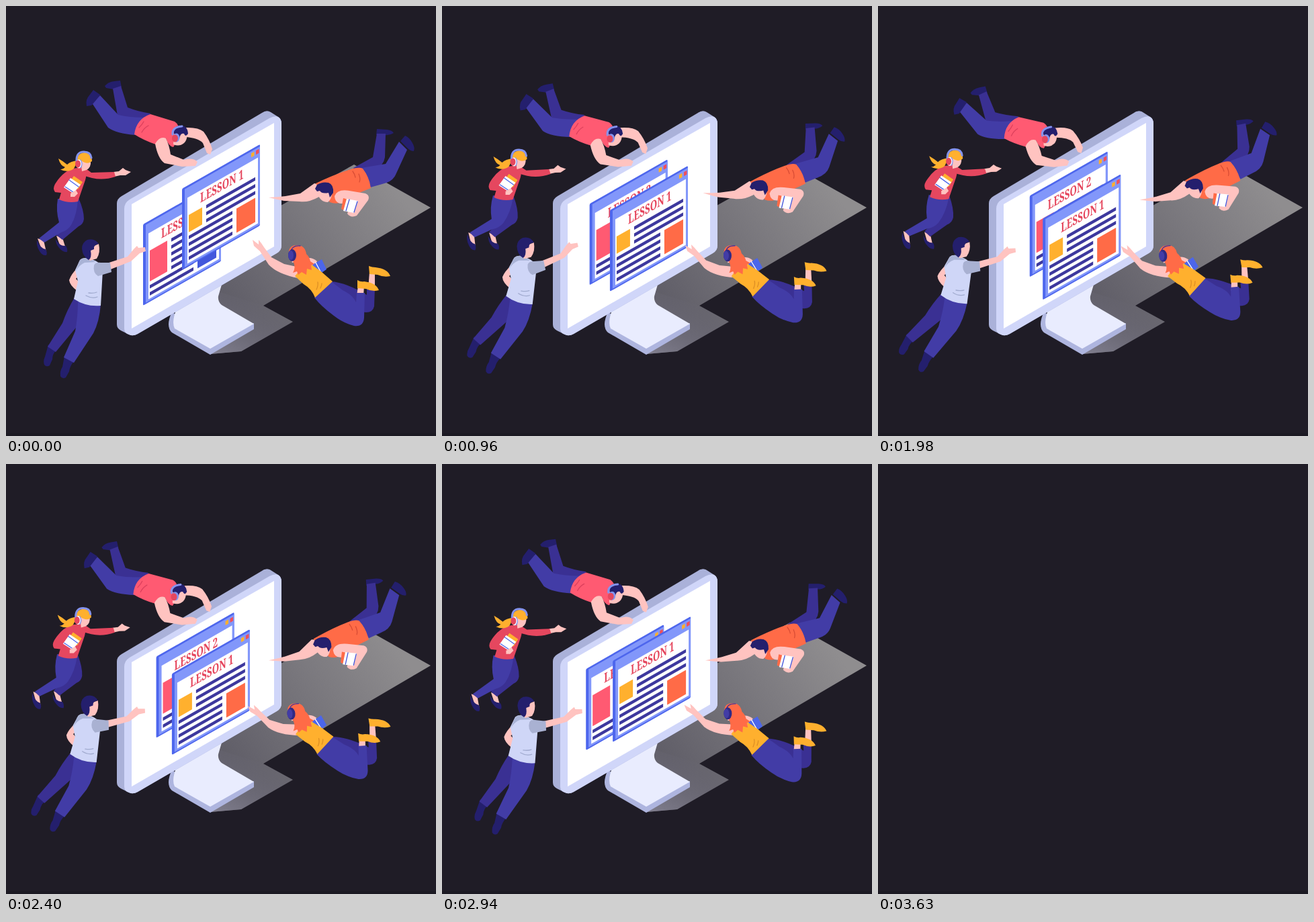
An HTML page that plays this animation: 640 by 640 pixels, repeating every 3660 ms.

```html
<!DOCTYPE html>
<html lang="en">
<head>
<meta charset="utf-8">
<title>Online lessons</title>
<style>
html, body { margin: 0; height: 100%; overflow: hidden; background: #1f1c26; }
svg { display: block; width: 100vw; height: 100vh; }
text { font: 600 19.5px "Noto Serif", serif; fill: #e5455c; }
.skin { fill: #ffc3c0; }
.near { fill: #423ca6; }
.far { fill: #3a3093; }
.dark { fill: #241f6d; }
.pink { fill: #ff5a72; }
.red { fill: #e5475f; }
.orange { fill: #ff6b47; }
.gold { fill: #ffb02e; }
.white { fill: #fff; }
.blue { fill: #4c66ea; }
.line { fill: none; stroke-width: 1.3; stroke-linecap: round; }
.band { fill: none; stroke: #8493ee; stroke-width: 3; stroke-linecap: round; }
</style>
</head>
<body>
<svg viewBox="0 0 640 640">
<defs>
  <linearGradient id="shade" gradientUnits="userSpaceOnUse" x1="330" y1="450" x2="580" y2="270">
    <stop offset="0" stop-color="#5f5d67"/><stop offset="1" stop-color="#8f8d8f"/>
  </linearGradient>
  <linearGradient id="foot" gradientUnits="userSpaceOnUse" x1="315" y1="518" x2="365" y2="425">
    <stop offset="0" stop-color="#7f7d8d"/><stop offset="1" stop-color="#686672" stop-opacity="0"/>
  </linearGradient>
</defs>
<path fill="#1b1922" d="M0 636H640V640H0Z"/>
<g id="scene">
  <path fill="url(#shade)" d="M304 518L350 514L427 470L383 446L632 300L518 236L400 302L300 420Z"/>
  <path fill="url(#foot)" d="M304 518L350 514L427 470L383 446L300 420Z"/>
  <path fill="#aeb5df" d="M247 455Q237 477 247 486L304 519L369 481V472L304 500Z"/>
  <path fill="#e9ecfe" d="M254 450Q246 470 251 480L304 510L369 473L321 445Q315 440 316 432L323 408Z"/>

  <path fill="#aab1d9" d="M165 294Q165 287 172 283L381 159Q388 154 394 158L405 165Q410 168 410 175V357Q410 364 403 368L196 488Q189 492 183 489L171 483Q165 480 165 474Z"/>
  <path fill="#d0d6f9" d="M176 302Q176 293 184 288L392 167Q400 163 405 165Q410 168 410 175V357Q410 364 403 368L196 488Q189 492 183 489Q176 487 176 480Z"/>
  <path class="white" d="M187 295L399 174V358L187 480Z"/>
  <g id="back"></g>
  <g id="front"></g>

  <g id="A">
    <g id="A-legs">
      <path class="dark" d="M147 119Q152 113 161 112L170 111L172 121L160 124L149 122Z"/>
      <path class="far" d="M159 123L171 119L181 151Q196 157 215 160L203 182L166 163Z"/>
      <path class="dark" d="M120 149Q118 139 124 133L130 125L140 132L136 141L127 148Z"/>
      <path class="near" d="M129 146L140 133L167 162Q184 166 205 166L193 192Q164 190 152 181Z"/>
    </g>
    <path class="skin" d="M266 181Q286 180 294 187Q303 199 307 213L304 221L299 219L293 204Q286 196 266 195Z"/>
    <path class="pink" d="M191 191Q194 168 215 161L251 172Q260 178 258 196L249 210Q242 209 238 197L223 206Q205 200 191 191Z"/>
    <path class="line" stroke="#dc405d" d="M202 188Q206 181 212 178M198 181Q203 176 205 172"/>
    <path class="skin" d="M222 205Q229 193 238 197Q243 207 245 221L265 229Q278 225 285 232L282 238L262 239L236 234Q226 227 222 205Z"/>
    <path class="skin" d="M250 188Q260 180 269 187Q271 198 265 204Q258 210 249 206Z"/>
    <path class="dark" d="M250 190Q248 179 259 178Q270 177 271 190Q267 196 265 190Q260 188 258 197Z"/>
    <path class="band" d="M248 191Q247 180 262 179"/>
    <ellipse cx="253.5" cy="196" rx="5" ry="6.5" fill="#8493ee"/>
    <ellipse cx="251.5" cy="197" rx="4.5" ry="5.5" class="red"/>
  </g>

  <g id="B">
    <g id="B-leg2">
      <path class="skin" d="M75 342L84 345L89 361L82 361Z"/>
      <path class="dark" d="M74 347Q80 358 89 357Q92 361 91 366Q85 367 80 361Q74 355 74 347Z"/>
      <path class="far" d="M84 286L108 286Q116 304 116 317Q115 325 108 328L84 348L75 341L95 317Z"/>
    </g>
    <g id="B-leg1">
      <path class="skin" d="M47 346L56 349L60 366L54 365Z"/>
      <path class="dark" d="M46 348Q51 361 59 362Q62 367 60 371Q54 372 50 365Q45 358 46 348Z"/>
      <path class="near" d="M77 287L107 287Q106 310 97 326Q92 334 82 337L57 352L49 346L79 322Q74 305 77 287Z"/>
    </g>
    <g id="B-arm">
      <path class="skin" d="M160 247L168 246L174 241L178 244L186 247L178 252L170 252L161 254Z"/>
      <path class="red" d="M113 240Q121 243 127 248L161 247L163 254Q145 260 128 256L110 251Z"/>
    </g>
    <path class="red" d="M99 242L114 240Q122 246 118 259L107 291Q92 294 79 288L82 278L73 277Q69 272 73 265Q84 247 99 242Z"/>
    <path class="gold" d="M101 253L114 262L107 273L93 264Z"/>
    <path class="white" d="M96 256L111 266L100 279L86 270Z"/>
    <path class="line" stroke="#4c66ea" d="M94 259L108 269M88 269L100 277"/>
    <path class="skin" d="M96 279L104 274L107 279L102 284L96 284Z"/>
    <path class="gold" d="M107 230Q96 231 91 236Q85 231 78 227Q81 238 88 240Q84 244 80 243Q92 249 101 242Z"/>
    <path class="skin" d="M111 229L126 230Q127 240 120 244L113 246Z"/>
    <path class="gold" d="M106 233Q104 220 116 218Q128 217 128 231Q121 237 112 230Z"/>
    <path class="band" d="M105 232Q104 217 116 217Q126 217 127 226"/>
    <ellipse cx="108.5" cy="235" rx="4.5" ry="6.5" class="white"/>
    <ellipse cx="107" cy="235" rx="4" ry="5.5" class="red"/>
    <path class="line" stroke="#8493ee" d="M111 229Q115 235 111 241"/>
  </g>

  <g id="C">
    <g id="C-legs">
      <path class="dark" d="M551 192L552 183L567 184Q575 185 577 189Q571 193 564 192Z"/>
      <path class="far" d="M552 190H565L564 225Q562 238 550 242L533 261L517 241L546 225Z"/>
      <path class="dark" d="M587 201L594 193Q601 196 605 204Q609 211 607 216Q602 216 598 212Z"/>
      <path class="near" d="M585 202L597 214L580 251Q575 262 560 265L542 270L529 241L565 235Z"/>
    </g>
    <g id="C-arm">
      <path class="skin" d="M391 285L406 284L416 283L438 279L459 264L477 268L466 284Q450 293 437 291L414 290L404 288Z"/>
    </g>
    <path class="orange" d="M461 264Q490 250 513 243Q526 239 531 242Q541 255 543 271L521 280L503 291Q491 296 482 292Z"/>
    <path class="line" stroke="#d94d35" d="M516 246Q519 250 520 255M525 250Q528 257 526 262"/>
    <path class="skin" d="M489 283Q493 272 511 275L535 279Q542 282 539 289L522 312Q513 316 508 309L511 301L523 293L502 294Q490 295 489 283Z"/>
    <path class="orange" d="M502 286L509 288L506 306L499 302Z"/>
    <path class="white" d="M507 287L524 290L518 308L502 305Z"/>
    <path class="line" stroke="#4054d9" d="M511 288L506 305M523 291L518 307"/>
    <path class="skin" d="M463 277L485 274Q486 287 479 292Q467 292 463 277Z"/>
    <path class="dark" d="M460 272L463 266Q471 261 480 263Q488 266 487 278L482 285L480 278Q470 280 467 275L463 276Z"/>
  </g>

  <g id="E">
    <g id="E-legs">
      <path class="skin" d="M541 396H549V422H539Z"/>
      <path class="far" d="M483 410Q505 411 537 430L537 419H549L548 447Q546 456 536 456L500 452Z"/>
      <path class="gold" d="M540 387Q545 389 550 389Q568 391 572 402Q562 404 553 400L541 399Z"/>
      <path class="skin" d="M524 416H533L532 432H522Z"/>
      <path class="near" d="M484 410Q492 416 501 423Q516 430 521 441L522 427H534L533 464Q532 478 518 476Q502 472 488 461Q469 447 459 434Z"/>
      <path class="gold" d="M523 408Q528 411 533 410Q551 412 555 423Q546 426 536 421L523 420Z"/>
    </g>
    <path class="skin" d="M445 376Q455 373 463 380L459 388L447 386Z"/>
    <path class="blue" d="M456 385L470 377L477 392L464 401Z"/>
    <path class="line" stroke="#fff" d="M461 382L469 397"/>
    <g id="E-arm">
      <path class="skin" d="M437 389L414 384L395 374L384 359L380 353L376 348L376 355L367 348L369 357L378 365L391 385Q404 399 435 405Z"/>
    </g>
    <path class="gold" d="M430 402L440 390L455 385L470 396L486 410L460 434Q455 421 443 414Z"/>
    <path class="line" stroke="#dc8e25" d="M462 422Q465 416 464 411M468 420Q470 416 470 413"/>
    <path class="skin" d="M421 365L429 360L434 379L426 382Z"/>
    <path class="orange" d="M421 365Q422 356 433 356Q445 356 447 369Q452 374 453 380L459 384L454 386L455 393L448 391L447 400L440 396L435 400L433 395L427 397Q432 389 427 379Z"/>
    <path class="line" stroke="#3c379c" stroke-width="3" d="M424 366Q425 356 438 357"/>
    <ellipse cx="426" cy="371" rx="6" ry="9" fill="#2f2984"/>
    <ellipse cx="424" cy="371" rx="4" ry="7" class="near"/>
  </g>

  <g id="D">
    <g id="D-leg1">
      <path class="dark" d="M63 504L75 512Q69 518 69 526L65 535Q60 538 57 534Q55 528 58 522Z"/>
      <path class="far" d="M102 434L124 445L108 474L74 515L62 507L84 472Q91 452 102 434Z"/>
    </g>
    <g id="D-leg2">
      <path class="dark" d="M87 521L101 529Q95 536 94 544L89 553Q84 556 81 551Q80 543 84 537Z"/>
      <path class="near" d="M107 440L141 444Q139 470 130 487L101 531L86 523L103 484Q107 462 107 440Z"/>
    </g>
    <path class="skin" d="M107 389Q97 399 94 408Q95 416 106 424L110 412L104 406L112 398Z"/>
    <path fill="#cfd6f7" d="M110 378Q116 372 130 378Q144 383 144 394L141 446Q119 448 101 436L107 410L103 393Z"/>
    <path fill="#a9b3d6" d="M107 386Q109 374 121 375L134 381L117 382Q108 386 103 396Z"/>
    <path class="line" stroke="#a1abcf" stroke-width="2" d="M119 431Q128 436 136 433M123 427Q130 428 135 426"/>
    <g id="D-arm">
      <path class="skin" d="M150 383L181 373L190 362L195 357L197 360L207 359L208 365L199 368L186 380L153 393Z"/>
      <path fill="#a9b1d2" d="M131 386Q133 381 141 382L155 382L157 396L137 402Q129 397 131 386Z"/>
    </g>
    <path class="skin" d="M125 360L138 354Q141 367 135 376L125 379L121 375Z"/>
    <path class="dark" d="M113 361Q113 352 121 348Q132 345 138 354Q130 355 131 362L126 364Q128 375 123 378Q114 373 113 361Z"/>
  </g>
</g>
</svg>
<script>
const LOOP = 3660, BLANK = 3630, SLOPE = .57;
const $ = id => document.getElementById(id);

const rect = (x, y, w, h, fill) => `<rect x="${x}" y="${y}" width="${w}" height="${h}" fill="${fill}"/>`;

// Each text row: [left, right] along the window's width
function makeWindow(id, title, rows, blocks) {
  const lines = rows.map(([a, b], i) => rect(a, 44.8 + i * 10.3, b - a, 5, '#3d389e')).join('');
  $(id).innerHTML = `<g transform="matrix(1 ${-SLOPE} 0 1 0 0)">
    <rect width="116" height="121" rx="2" fill="#4d66ed"/>
    ${rect(4, 3, 112, 116, '#8297fa')}${rect(8, 18, 105, 98, '#fff')}
    ${rect(103, 6, 4.5, 6, '#ffb02e')}${rect(110, 6, 4.5, 6, '#f0505c')}
    ${lines}${blocks.map(b => rect(...b)).join('')}</g>
    <text transform="matrix(.68 ${-.68 * SLOPE} 0 1 27 36) translate(0 0)">${title}</text>`;
  $(id).querySelector('text').setAttribute('transform', `matrix(.68 ${-.68 * SLOPE} 0 1 27 21)`);
}

makeWindow('back', 'LESSON 2',
  [[42, 109], [42, 109], [42, 109], [42, 75], [42, 75], [10, 75], [10, 75]],
  [[10, 44.8, 26, 46, '#ff5a72'], [81, 75.7, 28, 36, '#4358dc']]);
makeWindow('front', 'LESSON 1',
  [[36, 109], [36, 109], [36, 109], [10, 75], [10, 75], [10, 75], [10, 75]],
  [[10, 44.8, 20, 25.6, '#ffb02e'], [81, 75.7, 28, 36, '#ff6b47']]);

const times = [0, 510, 960, 1470, 1720, 2160, 2400, 2940, BLANK];
const poses = {
  win: [0, .27, .71, .955, 1, .965, .89, .465, 0],
  A: [0, .1, .45, 1, 1.05, .73, .43, .08, 0],
  B: [0, .4, .75, 1, 1.03, .8, .62, .32, 0],
  C: [0, .22, .6, 1, 1.05, .96, .87, .35, 0],
  D: [0, .27, .69, 1, 1.02, .84, .69, .28, 0],
  reach: [0, 4, 4, -.5, 1, 4, 6, 7.4, 0]
};

// Smooth cubic through the pose values
function at(name, t) {
  const v = poses[name], last = times.length - 1;
  let i = 0;
  while (i < last - 1 && t >= times[i + 1]) i++;
  const slope = k => k === 0 || k === last ? 0 : (v[k + 1] - v[k - 1]) / (times[k + 1] - times[k - 1]);
  const d = times[i + 1] - times[i], s = Math.min(1, (t - times[i]) / d), r = 1 - s;
  return v[i] * r * r * (1 + 2 * s) + v[i + 1] * s * s * (3 - 2 * s)
    + d * s * r * (slope(i) * r - slope(i + 1) * s);
}

const move = (id, x, y) => $(id).setAttribute('transform', `translate(${x} ${y})`);
const turn = (id, deg, cx, cy, x = 0, y = 0) =>
  $(id).setAttribute('transform', `translate(${x} ${y}) rotate(${deg} ${cx} ${cy})`);

function draw(t) {
  $('scene').style.visibility = t >= BLANK ? 'hidden' : 'visible';
  const { win, A, B, C, D, reach } = Object.fromEntries(Object.keys(poses).map(k => [k, at(k, t)]));
  const wave = Math.sin(t / BLANK * 2 * Math.PI);

  move('front', 262 - 17 * win, 272 + 45 * win);
  move('back', 204 + 22 * win, 325 - 43 * win);

  turn('A', -4.6 * A, 262, 215, -2 * A, A);
  turn('A-legs', -1.3 * A, 203, 176);

  move('B', -2 * B, -4 * B);
  turn('B-leg1', 9 * B, 94, 290);
  turn('B-leg2', 5 * B, 96, 290);
  turn('B-arm', -1.5 * B, 115, 248);

  turn('C', -4.6 * C, 420, 288, -2 * C, -C);
  turn('C-legs', -6.2 * C, 530, 254);
  turn('C-arm', 5.7 * wave, 466, 272);

  turn('E', -5.2 * C, 433, 390);
  turn('E-arm', -reach, 428, 394);

  turn('D', 4.6 * D, 125, 370, -3 * D, -4 * D);
  turn('D-leg1', 8 * D, 114, 440);
  turn('D-leg2', 2.9 * D, 122, 444);
  turn('D-arm', -5.5 * wave - 2.5 * D, 140, 390);
}

const start = performance.now();
function tick(now) {
  draw(Math.max(0, now - start) % LOOP);
  requestAnimationFrame(tick);
}
draw(0);
requestAnimationFrame(tick);
</script>
</body>
</html>
```
